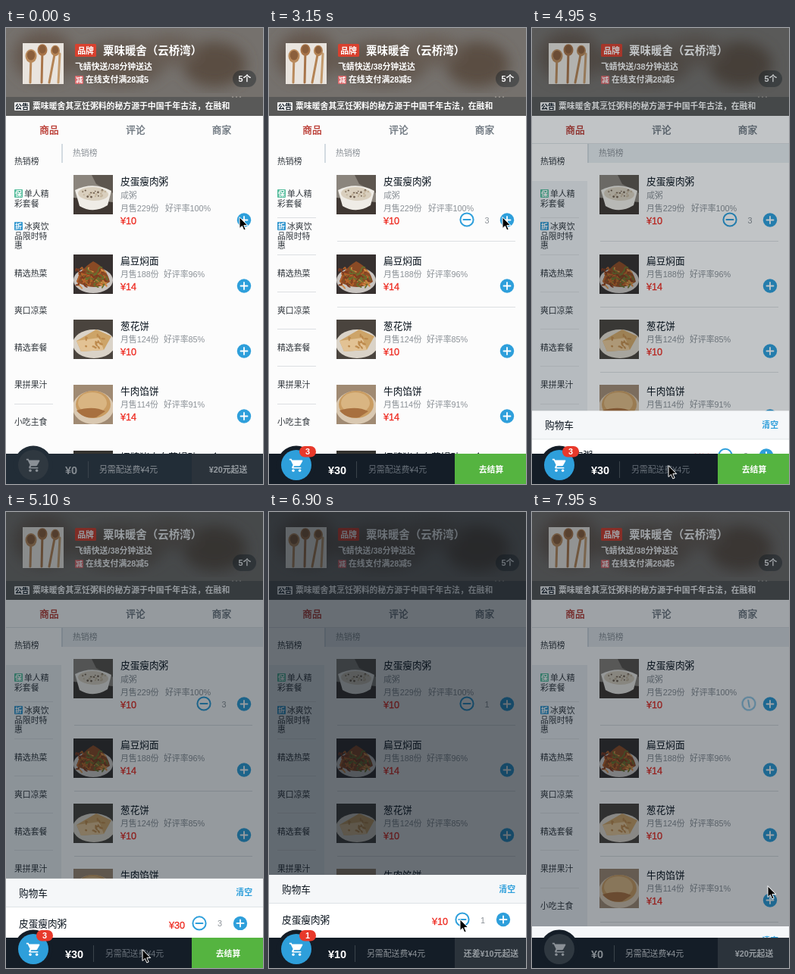
Animation of 339 by 602 pixels, one loop 8000 ms. Source, as an HTML page:

```html
<!DOCTYPE html>
<html lang="zh-CN">
<head>
<meta charset="utf-8">
<title>点餐</title>
<style>
html, body { margin: 0; width: 100%; height: 100%; overflow: hidden; background: #fcfcfc; }
svg { display: block; }
text { font: 10.85px "Liberation Sans", "Noto Sans CJK SC", "Noto Sans CJK", sans-serif; fill: #8b9197; }
.dark { fill: #07111b; }
.menu { fill: #30363c; font-weight: 300; }
.name { font-size: 12.65px; fill: #07111b; }
.price { font-size: 12.65px; fill: #ee2a20; stroke: #ee2a20; stroke-width: .3px; }
.white { fill: #fff; font-weight: 700; }
.title { font-size: 14.46px; font-weight: 700; }
.tab { font-size: 12.65px; fill: #6a737c; stroke: #6a737c; stroke-width: .35px; }
.active { fill: #b8352d; stroke: #b8352d; }
.mini { font-size: 9px; }
.bold { font-weight: 700; }
.blue { fill: #2e9fdb; font-weight: 700; }
.mid { text-anchor: middle; }
.end { text-anchor: end; }

.moving { animation: 8s linear infinite paused; animation-delay: calc(var(--t) * -1ms); }
#mask { animation-name: mask; }
#list { animation-name: list; }
#minus { animation-name: minus; }
#cursor { animation-name: cursor; }
#ball, #ball circle { animation: .4s paused; animation-delay: calc(var(--fly) * -1ms); }
#ball { opacity: 0; animation-name: fall; animation-timing-function: cubic-bezier(.49, -.29, .75, .41); }
#ball circle { animation-name: drift; animation-timing-function: linear; }

@keyframes fall {
  from { opacity: 1; transform: translateY(268px); }
  to { opacity: 1; transform: translateY(575px); }
}
@keyframes drift {
  from { transform: translateX(305px); }
  to { transform: translateX(36px); }
}
@keyframes mask {
  0%, 59.375% { opacity: 0; }
  65.625%, 97.125% { opacity: 1; }
  100% { opacity: .54; }
}
@keyframes list {
  0% { transform: translateY(83px); }
  59.375% { transform: translateY(83px); animation-timing-function: ease; }
  65.625%, 97.12% { transform: none; }
  97.125% { transform: translateY(45px); animation-timing-function: ease-in-out; }
  99.375% { transform: translateY(68px); }
  100% { transform: translateY(72px); }
}
@keyframes minus {
  0%, 11.875% { transform: translate(283px, 253px) rotate(180deg); opacity: 0; }
  16.875%, 97.12% { transform: translate(261px, 253px) rotate(0deg); opacity: 1; }
  97.125% { transform: translate(276px, 253px) rotate(0deg); opacity: 1; }
  99.375% { transform: translate(286px, 253px) rotate(80deg); opacity: .55; }
  100% { transform: translate(289px, 253px) rotate(102deg); opacity: .4; }
}
@keyframes cursor {
  0% { transform: translate(308px, 250px); }
  47.5% { transform: translate(308px, 250px); animation-timing-function: ease-in-out; }
  56.25%, 66% { transform: translate(180px, 578px); }
  71.25% { transform: translate(237px, 545px); animation-timing-function: ease-out; }
  75% { transform: translate(252px, 538px); }
  88.75% { transform: translate(252px, 538px); animation-timing-function: ease-in-out; }
  96.875%, 100% { transform: translate(311px, 494px); }
}
</style>
</head>
<body>
<svg id="stage" width="339" height="602" viewBox="0 0 339 602"></svg>
<script>
const LOOP = 8000, STEP = 150;
const COUNTS = [[0, 0], [1050, 1], [1950, 2], [2700, 3], [6300, 2], [6900, 1], [7800, 0]];
const THROWS = [950, 1850, 2600];

let seed = 7;
const rand = (a, b) => a + (seed = seed * 16807 % 2147483647) / 2147483647 * (b - a);
const range = n => [...Array(n).keys()];

const text = (x, y, str, cls = '', id = '') =>
  `<text x="${x}" y="${y}" dy=".37em" class="${cls}" ${id && `id="${id}"`}>${str}</text>`;
const rect = (x, y, w, h, fill, more = '') =>
  `<rect x="${x}" y="${y}" width="${w}" height="${h}" fill="${fill}" ${more}/>`;
const circle = (x, y, r, fill) => `<circle cx="${x}" cy="${y}" r="${r}" fill="${fill}"/>`;
const ellipse = (x, y, rx, ry, fill, turn = 0) =>
  `<ellipse cx="${x}" cy="${y}" rx="${rx}" ry="${ry}" fill="${fill}" transform="rotate(${turn} ${x} ${y})"/>`;
const path = (d, fill, stroke = 'none', width = 1) =>
  `<path d="${d}" fill="${fill}" stroke="${stroke}" stroke-width="${width}" stroke-linecap="round"/>`;
const rule = (x, y, w, at) => rect(x, y, w, 1, '#dcdfe2', `data-at="${at}"`);
const plus = (x, y) => circle(x, y, 9.2, '#2e9fdb') +
  path(`M${x - 4.5} ${y}h9M${x} ${y - 4.5}v9`, 'none', '#fff', 1.8);
const minusIcon = '<circle r="8.6" fill="#fff" fill-opacity=".6" stroke="#2e9fdb" stroke-width="2"/>' +
  path('M-4.5 0h9', 'none', '#2e9fdb', 2);

function header() {
  const spoon = (x, y, r, tip, color) => path(`M${x} ${y}L${tip} 72`, 'none', color, 3) +
    ellipse(x, y, r, r * 1.2, color) + ellipse(x, y - 1, r * .7, r * .85, '#8b5f3c');
  return rect(0, 0, 339, 116, '#75716d') +
    `<g filter="url(#soft)" clip-path="url(#top)">
      ${ellipse(50, 38, 40, 34, '#64574d')}${ellipse(150, 46, 60, 30, '#62574e')}
      ${ellipse(275, 48, 42, 30, '#5a4d42')}${ellipse(215, 30, 40, 20, '#675d55')}</g>` +
    rect(0, 91, 339, 25, '#07111b', 'opacity=".25"') +
    rect(22, 20, 54, 54, '#e9e4de') +
    spoon(33, 37, 7.5, 32, '#b98a5c') + spoon(48, 29, 6.5, 47, '#a87449') +
    spoon(65, 30, 6, 57, '#b48354') + path('M71 34L69 72', 'none', '#c39a6d', 3) +
    rect(91, 21, 28, 17, '#d8412f', 'rx="1.5"') + text(105, 29.5, '品牌', 'white mid') +
    text(128, 30, '粟味暖舍（云桥湾）', 'white title') +
    text(91, 51, '飞蜻快送/38分钟送达', 'white') +
    rect(91, 63, 11, 11, '#d9686a', 'rx="1"') + text(96.5, 68.5, '减', 'white mini mid') +
    text(105, 68, '在线支付满28减5', 'white') +
    rect(299, 56, 31, 22, '#07111b', 'rx="11" opacity=".35"') + text(315, 67, '5个', 'white mid') +
    range(3).map(i => circle(299 + i * 5, 91, 1, '#98958f')).join('') +
    rect(11, 98, 20, 11, '#f1f1f1', 'rx="1"') + text(21, 103.5, '公告', 'mini dark bold mid') +
    text(35, 103, '粟味暖舍其烹饪粥料的秘方源于中国千年古法，在融和', 'white');
}

function sidebar() {
  const plain = { 176: '热销榜', 324: '精选热菜', 373: '爽口凉菜', 422: '精选套餐', 471: '果拼果汁', 520: '小吃主食' };
  const badge = (y, color, str) => rect(11, y, 11, 11, color, 'rx="1"') + text(16.5, y + 5.5, str, 'white mini mid');
  return rect(0, 202, 73, 360, '#edf0f3', 'data-at="4800"') +
    Object.entries(plain).map(([y, str]) => text(11, y, str, 'menu')).join('') +
    badge(213, '#56bd9d', '保') + text(24, 219, '单人精', 'menu') + text(11, 232, '彩套餐', 'menu') +
    badge(256, '#3598cf', '折') + text(24, 262, '冰爽饮', 'menu') +
    text(11, 275, '品限时特', 'menu') + text(11, 287, '惠', 'menu') +
    range(6).map(i => rule(11, 250 + i * 49.2 | 0, 51, i < 5 ? 1050 : 0)).join('');
}

const noodles = range(60).map(() => {
  const x = rand(6, 40), y = rand(14, 38) + Math.abs(x - 25) * .25;
  return path(`M${x} ${y}q${rand(-6, 8)} ${rand(-7, 5)} ${rand(-5, 9)} ${rand(0, 7)}`, 'none',
    ['#b5622b', '#d08a45', '#7d3a20', '#66722f'][rand(0, 4) | 0], 1.7);
}).join('');
const grains = range(26).map(() =>
  circle(rand(11, 42), rand(20, 30), rand(.6, 1.6), rand(0, 1) < .4 ? '#6b5a4a' : '#c3b49c')).join('');
const spots = range(16).map(() => ellipse(rand(14, 40), rand(20, 38), rand(1, 3), 1.2, '#bd8a4d', rand(0, 90))).join('');

const pictures = [
  rect(0, 0, 52, 52, '#8b857d') + path('M24 0H52V24L30 12Z', '#5d564f') + path('M0 30L52 36V52H0Z', '#403833') +
    path('M2 20Q26 8 50 21L45 40Q26 52 8 41Z', '#efece6') + ellipse(26, 25, 20, 9, '#d9cfbe', 3) + grains,
  rect(0, 0, 52, 52, '#36302f') + ellipse(26, 34, 26, 17, '#c9c4c0') +
    path('M4 36Q8 20 26 9Q44 18 48 36Q28 50 4 36Z', '#8a4a25') + noodles,
  rect(0, 0, 52, 52, '#4a443e') + ellipse(27, 32, 28, 19, '#dad3c8') + path('M4 28L30 13L50 22L40 40L10 42Z', '#cda468') +
    path('M4 28L34 24L40 40L10 42Z', '#e2c294') + spots,
  rect(0, 0, 52, 52, '#a08a73') + ellipse(26, 30, 27, 22, '#d9c8b1') + ellipse(26, 26, 23, 18, '#c99c62') +
    ellipse(25, 24, 19, 14, '#d9b582') + path('M4 34Q26 27 42 35L30 43Q14 46 4 34Z', '#a8703f'),
  rect(0, 0, 52, 52, '#35332f')
];

function foods() {
  const items = [
    ['皮蛋瘦肉粥', 229, 100, 10], ['扁豆焖面', 188, 96, 14], ['葱花饼', 124, 85, 10],
    ['牛肉馅饼', 114, 91, 14], ['招牌猪肉白菜锅贴/10个', 101, 90, 17]
  ];
  const tops = [194, 299, 385, 471, 558];
  const row = ([name, sold, rate, cost], i) => {
    const y = tops[i], gap = i ? 0 : 18;
    return `<svg x="89" y="${y}" width="52" height="52">${pictures[i]}</svg>` +
      text(151, y + 8, name, 'name') + (i ? '' : text(151, 221, '咸粥')) +
      text(151, y + 26 + gap, `月售${sold}份`) + text(i ? 208 : 210, y + 26 + gap, `好评率${rate}%`) +
      text(151, y + 42 + gap, '¥' + cost, 'price') + plus(314, y + 41.5 + gap);
  };
  return rect(74, 153, 265, 25, '#e9edf0', 'data-at="4800"') + rect(73, 153, 2, 25, '#d3dbe1') +
    text(88, 165, '热销榜') + items.map(row).join('') +
    rule(90, 281, 235, 2100) + rule(90, 368, 235, 1050) + rule(90, 454, 235, 4800) + rule(90, 541, 235, 4800) +
    `<g id="minus" class="moving">${minusIcon}</g>` + text(287.5, 253.5, '', 'mid', 'count');
}

const list = () => `<g id="list" class="moving">
  ${rect(0, 479, 339, 83, '#fff')}${rect(0, 479, 339, 37, '#f5f7f9')}${rect(0, 516, 339, 1, '#dde2e6')}
  ${text(17, 498, '购物车', 'name')}${text(325, 497.5, '清空', 'blue end')}
  <g id="row">${text(17, 538, '皮蛋瘦肉粥', 'name')}${text(236, 540, '', 'price end', 'rowPrice')}
  <g transform="translate(255 538)">${minusIcon}</g>${text(282, 538.5, '', 'mid', 'rowCount')}${plus(309, 538)}</g></g>`;

const bar = () => rect(0, 562, 339, 40, '#141d27', 'id="bar"') +
  `<circle id="rim" cx="36" cy="577" r="25.5"/><circle id="cart" cx="36" cy="577" r="20"/>
  <g id="cartIcon" transform="translate(26 567) scale(.86)">
  ${path('M1 2V4H3L6.6 11.6L5.2 14Q4 17 7 17H19V15H7.4L8.5 13H16Q17 13 17.7 12L21.3 5.5Q21.7 4 20.4 4H5.2L4.3 2Z', 'currentColor')}
  ${circle(7, 20, 2, 'currentColor')}${circle(17, 20, 2, 'currentColor')}</g>
  <g id="badge">${rect(40, 552, 22, 14.5, '#e8392b', 'rx="7.2"')}${text(51, 559.3, '', 'white mid', 'badgeCount')}</g>` +
  text(78, 584, '', 'title', 'total') + rect(0, 572, 1, 22, '#3a434b', 'id="split"') +
  text(0, 583, '另需配送费¥4元', '', 'fee') + rect(245, 562, 94, 40, '#2b333b', 'id="pay"') +
  text(293, 583, '', 'bold mid', 'payText');

stage.innerHTML = `<defs><filter id="soft"><feGaussianBlur stdDeviation="9"/></filter>
  <clipPath id="top">${rect(0, 0, 339, 116, '#000')}</clipPath></defs>` +
  rect(0, 0, 339, 602, '#fcfcfc') + sidebar() + foods() + rect(0, 116, 339, 37, '#fcfcfc') +
  rect(0, 152, 339, 1, '#dfe3e6', 'data-at="4800"') +
  text(57, 134.5, '商品', 'tab active mid') + text(171, 134.5, '评论', 'tab mid') + text(284.5, 134.5, '商家', 'tab mid') +
  header() + rect(0, 0, 339, 562, '#07111b', 'id="mask" class="moving" fill-opacity=".6"') +
  list() + bar() + `<g id="ball">${circle(0, 0, 7.6, '#2e9fdb')}</g>
  <g id="cursor" class="moving">${path('M0 0V14.5L3.4 11.4L5.8 17L8.2 16L5.8 10.6H10.4Z', '#000', '#fff', 1)}</g>`;

const $ = id => document.getElementById(id);
const put = (id, str) => { $(id).textContent = str; };
const paint = (id, color) => { $(id).style.fill = color; };
const show = (el, on) => { el.style.display = on ? '' : 'none'; };

function setCount(n, late) {
  const total = n * 10, ready = total >= 20;
  put('count', n || '');
  put('rowCount', n);
  put('badgeCount', n);
  put('rowPrice', '¥' + total);
  put('total', '¥' + total);
  put('payText', ready ? '去结算' : n ? `还差¥${20 - total}元起送` : '¥20元起送');
  show($('badge'), n);
  show($('row'), n);
  const x = [108, 113][n] || 115;
  $('split').setAttribute('x', x);
  $('fee').setAttribute('x', x + (n ? 16 : 15));
  const base = n || late ? '#141d27' : '#222d37';
  paint('bar', base);
  paint('rim', base);
  paint('cart', n ? '#2e9fdb' : '#2f3840');
  $('cartIcon').style.color = n ? '#fff' : '#8a9096';
  paint('total', n ? '#fff' : '#858b91');
  paint('fee', ready ? '#69717a' : '#8c9298');
  paint('pay', ready ? '#55b440' : '#2b333b');
  paint('payText', ready ? '#fff' : '#959ba0');
}

const timed = [...document.querySelectorAll('[data-at]')];
const start = performance.now();
let last = -1;
function draw() {
  // The screen advances in discrete steps.
  const t = Math.floor((performance.now() - start) % LOOP / STEP) * STEP;
  if (t !== last) {
    last = t;
    const thrown = THROWS.filter(at => at <= t).pop();
    stage.style.setProperty('--t', t);
    stage.style.setProperty('--fly', thrown ? t - thrown : -1);
    timed.forEach(el => show(el, t >= el.dataset.at));
    setCount(COUNTS.filter(([at]) => at <= t).pop()[1], t > 4800);
  }
  requestAnimationFrame(draw);
}
draw();
</script>
</body>
</html>
```
